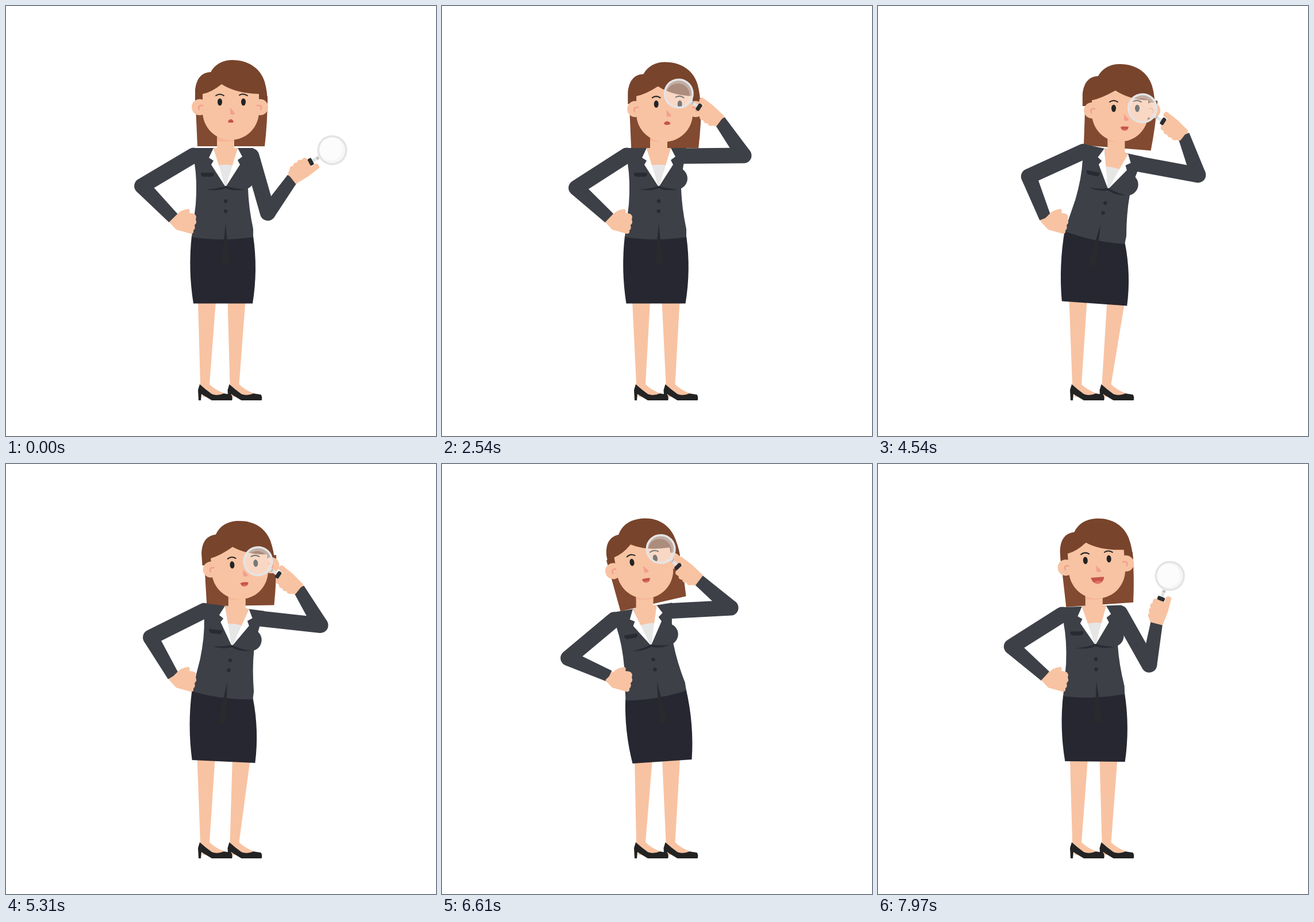
Animation, 748 px wide and 748 px high, one loop 8 s. Source, as an HTML page with a canvas:

```html
<!DOCTYPE html>
<html lang="en">
<head>
<meta charset="utf-8">
<title>Woman with magnifying glass</title>
<style>
html, body { margin: 0; height: 100%; overflow: hidden; background: #fff; }
canvas { display: block; width: 100vw; height: 100vh; }
</style>
</head>
<body>
<canvas width="748" height="748"></canvas>
<script>
const ctx = document.querySelector('canvas').getContext('2d');
const LOOP = 8000, RAD = Math.PI / 180;
const SKIN = '#f8c3a2', BLUSH = '#f29f8f', JACKET = '#3d4047', DARK = '#2a2b32',
  SKIRT = '#272731', INK = '#232324', HAIR = '#78442c', BACK_HAIR = '#824a30';

// turn/dx/dy: torso; hx/hy/tilt/hair: head; fx/fy: gaze; up/fore/hand/grip: right arm angles;
// hem/hemTilt/legL/legR: lower body; mw/mt/md: mouth width, top and bottom curve
const rest = { turn: 0, dx: 0, dy: 0, hx: 391, hy: 177, tilt: 0, hair: 0, fx: 0, fy: 0,
  up: 74, fore: -54.4, hand: -35.5, grip: 7, hem: 0, hemTilt: 0, legL: 0, legR: 0, mw: 5, mt: 6, md: 2 };
const peer = { ...rest, dx: -5, hx: 386, fx: 8, fy: -5, up: -0.5, fore: -124.6, hand: -139, grip: -5.5,
  hem: -5.5, legL: -3, legR: -3, mw: 8, mt: 4, md: 6 };
const peerLow = { ...peer, hx: 388, hy: 181, fx: 2, fy: 2, hand: -141, mw: 5, mt: 6, md: 2 };
const startRight = { ...peerLow, turn: 0.5, dx: -4, hx: 390, hy: 179, tilt: 3, hair: 3, fx: -3, fy: 1 };
const towardRight = { ...rest, turn: 4.5, dx: -2, dy: 1, hx: 404.5, hy: 178, tilt: 7, hair: 7, fx: -5, fy: 1,
  up: 5, fore: -113, hand: -145.5, grip: -8.5, hem: 0.5, hemTilt: 1, legL: -2, legR: -2 };
const right = { ...rest, turn: 12, dx: 1, dy: 2, hx: 421, hy: 180, hair: 4.5, fx: 8, fy: 8, up: 10.4,
  fore: -110, hand: -139.6, grip: -8, hem: -1, hemTilt: 8, legL: -1.5, legR: 13, mw: 7, mt: 1, md: 9 };
const farRight = { ...right, turn: 13.3, hx: 424, tilt: 1 };
const backRight = { ...right, turn: 10.8, hx: 418, tilt: -1, hair: 3 };
const center = { ...rest, dx: -2, hx: 380, hy: 178, tilt: -9, hair: -8, fx: 2, up: -2, fore: -141,
  hand: -138, grip: -3, hem: 5, hemTilt: -2, legL: -1, legR: -1, mw: 7, mt: 2, md: 8 };
const left = { ...center, turn: -9.3, dx: -5, hx: 352, tilt: -10, hair: -13, fx: -1, fy: -0.5,
  up: -3, fore: -139, hand: -140.4, grip: 6, hem: 5.5, hemTilt: -7, legL: 1, legR: -2.5, mt: 1, md: 9 };
const lower = { ...rest, turn: -2, dx: -1, hx: 380.5, hy: 178, tilt: -4, hair: -4, fy: -1.5,
  up: 60.5, fore: -80, hand: -73, grip: 4, hemTilt: 1, mw: 11.5, mt: 0, md: 15 };
const lowered = { ...lower, turn: 0.8, hx: 391, tilt: -1.7, hair: -0.5, up: 84, fore: -57, hand: -48 };

const keys = [[0, rest], [800, peer], [1700, peer], [2900, peerLow], [3300, startRight],
  [3640, towardRight], [4180, farRight], [4540, right], [4980, backRight], [5810, center],
  [6610, left], [7480, left], [7970, lower], [8240, lowered]];

// Monotone cubic interpolation: smooth through every key without overshoot
function poseAt(t) {
  const i = keys.findIndex(([time]) => time > t) - 1;
  const [t0, a] = keys[i], [t1, b] = keys[i + 1], span = t1 - t0, s = (t - t0) / span;
  const slope = (k, n) => keys[k] && keys[k + 1]
    ? (keys[k + 1][1][n] - keys[k][1][n]) / (keys[k + 1][0] - keys[k][0]) : 0;
  const tangent = (k, n) => {
    const p = slope(k - 1, n), q = slope(k, n);
    return p * q > 0 ? 2 * p * q / (p + q) : 0;
  };
  const pose = {};
  for (const n in a) {
    pose[n] = a[n] + (b[n] - a[n]) * s * s * (3 - 2 * s)
      + span * s * (1 - s) * ((1 - s) * tangent(i, n) - s * tangent(i + 1, n));
  }
  return pose;
}

function fill(color, d) {
  ctx.fillStyle = color;
  ctx.fill(new Path2D(d));
}
function line(color, width, d) {
  ctx.strokeStyle = color;
  ctx.lineWidth = width;
  ctx.stroke(new Path2D(d));
}
function oval(color, x, y, rx, ry = rx) {
  ctx.fillStyle = color;
  ctx.beginPath();
  ctx.ellipse(x, y, rx, ry, 0, 0, 7);
  ctx.fill();
}
function at(x, y, degrees, draw) {
  ctx.save();
  ctx.translate(x, y);
  ctx.rotate(degrees * RAD);
  draw();
  ctx.restore();
}
const polar = ([x, y], length, degrees) =>
  [x + length * Math.cos(degrees * RAD), y + length * Math.sin(degrees * RAD)];

function torsoPoint(p, x, y) {
  const c = Math.cos(p.turn * RAD), s = Math.sin(p.turn * RAD);
  x -= 382; y -= 398;
  return [382 + p.dx + x * c - y * s, 398 + p.dy + x * s + y * c];
}

function drawLegs(p) {
  [[0, p.legL], [51.5, p.legR]].forEach(([x, shift]) => at(x, 0, 0, () => {
    fill(SKIN, `M${334 + shift},513H${365 + shift}L354,658Q364,668 380,674V680H342L338,658Z`);
    fill(INK, 'M337,658Q348,668 358,675Q367,679 379,674L392,676Q395,681 393,686H358Q348,680 340,675L339,686H335L334,668Z');
  }));
}

function drawSkirt(p) {
  const [lx, ly] = torsoPoint(p, 323, 400), [rx, ry] = torsoPoint(p, 430, 400);
  const mid = 377.5 + p.hem, half = 51.5 + Math.max(0, p.hemTilt) * 0.65, tilt = p.hemTilt / 2;
  const hl = mid - half, hr = mid + half, yl = 517.5 - tilt, yr = 517.5 + tilt;
  fill(SKIRT, `M${lx},${ly}Q${(lx + hl) / 2 - 8},${(ly + yl) / 2} ${hl},${yl}
    L${hr},${yr}Q${(rx + hr) / 2 + 9},${(ry + yr) / 2} ${rx},${ry}Z`);
}

function drawTorso(p) {
  at(382 + p.dx, 398 + p.dy, p.turn, () => {
    ctx.translate(-382, -398);
    fill(JACKET, 'M322,247H430L424,283L421,318Q422,350 430,388V402Q376,410 323,402L330,345Q333,305 328,274Z');
    oval(JACKET, 413, 300, 19);
    fill('#292a2e', 'M382,378L375,450H389Z');
    fill(SKIN, 'M361,247H403L394,280H370Z');
    fill('#e6e6e6', 'M369,277Q382,275 395,277L382,315Z');
    fill('#fff', 'M361,247L353,264L361,269L357,276L382,315L370,277ZM403,247L411,262L403,268L407,276L382,315L394,277Z');
    fill(DARK, 'M349,319Q368,318 382,313Q398,318 415,319Q396,323 382,317Q366,323 349,319Z');
    fill(DARK, 'M339,290H362V293Q361,297 357,297H344Q340,297 339,293Z');
    oval(DARK, 382, 339.5, 3.3);
    oval(DARK, 382, 357, 3.3);
  });
}

function drawNeck(p) {
  const [x] = torsoPoint(p, 382, 247);
  fill(SKIN, `M${x - 15},220h30v37h-30Z`);
  fill('#f6b697', `M${x - 15},222h30v12q-15,4 -30,1Z`);
}

function drawHead(p, t) {
  const { fx, fy } = p;
  at(p.hx, p.hy, p.tilt, () => {
    at(-0.4 * fx, 0.5 * Math.max(0, fy), 0, () =>
      fill(HAIR, 'M-62,-10V-30C-60,-50 -52,-61 -35,-62C-27,-76 -14,-83 3,-83C31,-83 52,-68 59,-45Q64,-27 64,-8Z'));
    fill(SKIN, `M-49,${fy - 24}Q-33,${fy - 27} ${fx - 16},${fy - 41}
      Q${fx + 9},${fy - 25} 49,${fy - 24}V7A49,49 0 0 1 -49,7Z`);
    at(fx * 0.65, fy / 3, 0, () => {
      oval(SKIN, -54, -1, 14);
      oval(SKIN, 51, -1, 14);
      line(BLUSH, 2.5, 'M-55,3q-3,-8 6,-7M52,3q4,-8 -6,-7');
    });
    at(fx, fy, 0, () => {
      const open = Math.min(1, Math.max(0.12, Math.abs(t - 1370) / 70 - 0.6));
      oval(INK, -19, -10, 4, 6.3 * open);
      oval(INK, 22, -10, 4, 6.3 * open);
      line(INK, 2, 'M-26,-21Q-19,-26 -12,-21M15,-22Q22,-26 29,-21');
      fill(BLUSH, 'M-1,0L7,9Q7,12 3,12L-1,11Z');
      drawMouth(p.mw, p.mt, p.md);
    });
  });
}

function drawMouth(w, top, bottom) {
  at(0, 25 - bottom * 0.3, 0, () => {
    fill('#c65449', `M${-w},0C${-w * 0.6},${-top} ${w * 0.6},${-top} ${w},0
      C${w * 0.8},${bottom} ${-w * 0.8},${bottom} ${-w},0Z`);
    if (bottom > 5) oval('#e5796c', 0, bottom * 0.56, w * 0.48, bottom * 0.12);
  });
}

function drawSleeve(shoulder, elbow, wrist) {
  oval(SKIN, ...wrist, 9.5);
  line(JACKET, 27, `M${shoulder}L${elbow}`);
  const dx = wrist[0] - elbow[0], dy = wrist[1] - elbow[1], n = Math.hypot(dx, dy);
  const side = ([x, y], r) => [x - dy / n * r, y + dx / n * r];
  fill(JACKET, `M${side(elbow, 13.5)}L${side(wrist, 10.5)}L${side(wrist, -10.5)}L${side(elbow, -13.5)}Z`);
}

function drawLeftArm(p) {
  const shoulder = torsoPoint(p, 326, 260), wrist = [291, 369], upper = 104, lower = 78;
  const dx = wrist[0] - shoulder[0], dy = wrist[1] - shoulder[1], d = Math.hypot(dx, dy);
  const along = (upper ** 2 - lower ** 2 + d * d) / (2 * d);
  const out = Math.sqrt(Math.max(0, upper ** 2 - along ** 2));
  const elbow = [shoulder[0] + (dx * along - dy * out) / d, shoulder[1] + (dy * along + dx * out) / d];
  drawSleeve(shoulder, elbow, wrist);
  fill(SKIN, 'M284,376L299,361Q304,355 317,353Q321,354 319,360L326,361Q333,364 330,371Q333,378 328,381Q330,388 326,390Q327,397 321,396L296,389Z');
}

function drawRightArm(p) {
  const shoulder = torsoPoint(p, 427, 261);
  const elbow = polar(shoulder, 103, p.up), wrist = polar(elbow, 74, p.fore);
  drawSleeve(shoulder, elbow, wrist);
  at(...wrist, p.hand, () => {
    fill(SKIN, 'M-2,-11L4,-15q5,-6 9,-2q5,-5 9,-1q6,-4 9,1q8,-3 9,4V0L38,3L46,2q7,2 3,10L24,13L-1,11Z');
    at(42.5, -5, p.grip, drawGlass);
  });
}

function drawGlass() {
  ctx.lineCap = 'butt';
  line('#e3e3e3', 5.5, 'M2,0H18');
  line('#bdbdbd', 5.5, 'M12,0H15');
  ctx.lineCap = 'round';
  ctx.fillStyle = '#2b2c2e';
  ctx.beginPath();
  ctx.roundRect(-3.5, -6.5, 7, 13, 2);
  ctx.fill();
  ctx.translate(42.5, 0);
  oval('rgba(248,248,248,.4)', 0, 0, 24);
  ctx.fillStyle = 'rgba(235,235,235,.35)';
  ctx.beginPath();
  ctx.arc(0, 0, 24, 0, 7);
  ctx.closePath();
  ctx.moveTo(20, -3.3);
  ctx.arc(-0.5, -3.3, 20.5, 0, 2 * Math.PI);
  ctx.fill('evenodd');
  ctx.strokeStyle = '#e4e4e4';
  ctx.lineWidth = 3.6;
  ctx.beginPath();
  ctx.arc(0, 0, 24.3, 0, 7);
  ctx.stroke();
}

function frame(now) {
  const t = now % LOOP, p = poseAt(t);
  ctx.clearRect(0, 0, 748, 748);
  ctx.lineCap = 'round';
  drawLegs(p);
  at(p.hx, p.hy, p.hair, () => fill(BACK_HAIR, 'M-62,-25L-58,67H59Q64,25 64,-20Z'));
  drawSkirt(p);
  drawTorso(p);
  drawNeck(p);
  drawHead(p, t);
  drawLeftArm(p);
  drawRightArm(p);
  requestAnimationFrame(frame);
}
requestAnimationFrame(frame);
</script>
</body>
</html>
```
